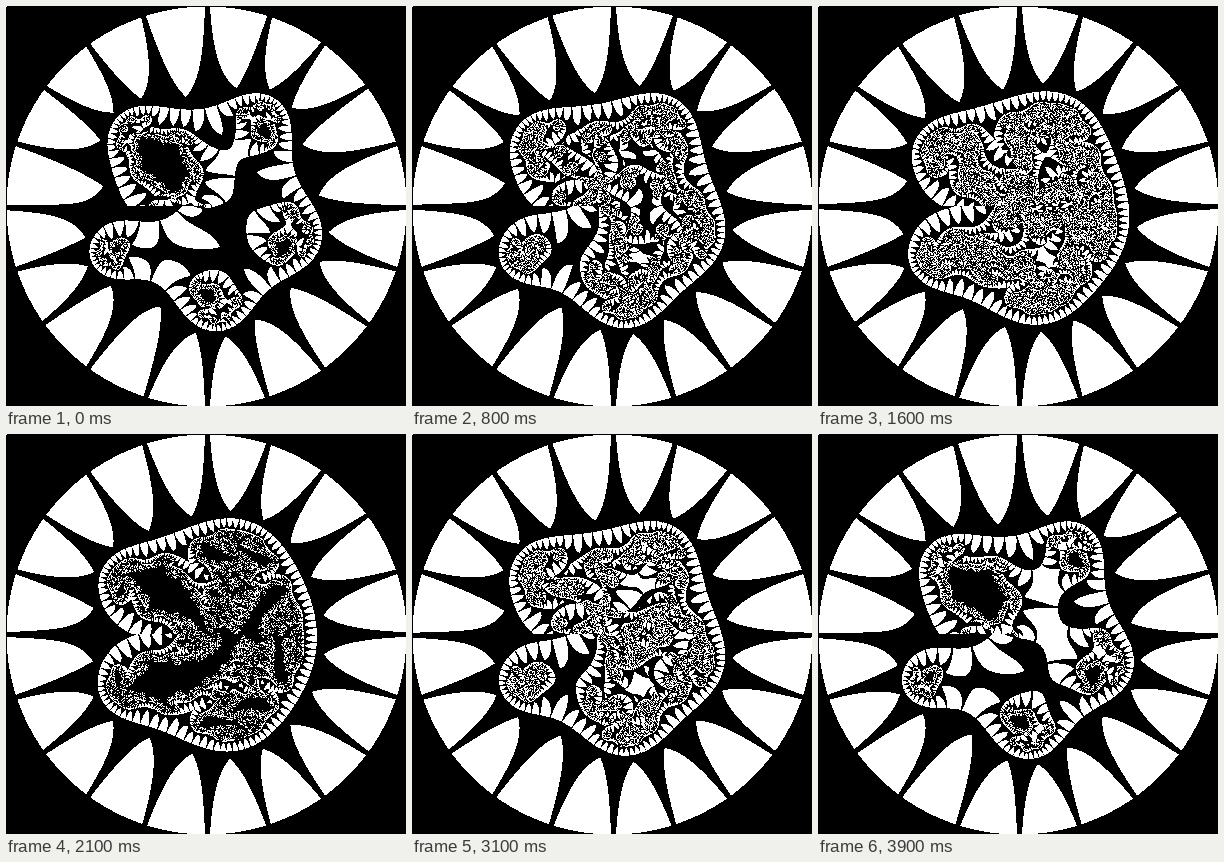
Recreate the animation shown at these times as an HTML page with a canvas. Size 400 by 400 pixels, loop 4 s.

```html
<!DOCTYPE html>
<html lang="en">
<head>
<meta charset="utf-8">
<title>Biomorph</title>
<style>
  html, body { margin: 0; width: 100%; height: 100%; overflow: hidden; background: #000; }
  canvas { display: block; width: 400px; height: 400px; }
</style>
</head>
<body>
<canvas id="stage" width="400" height="400"></canvas>
<script>
const SIZE = 400, BAIL = 2, MAX_ITER = 60;
const STEP_MS = 100, STEPS = 40, HALF = STEPS / 2;
const RE = -0.75;
const WHITE = 0xffffffff, BLACK = 0xff000000;
const ctx = document.getElementById('stage').getContext('2d');

// Biomorph test for z -> z^z + z^5 + c
function isWhite(x, y, im) {
  for (let n = 0; n < MAX_ITER; n++) {
    const rr = x * x + y * y;
    if (rr > BAIL * BAIL) break;
    const log = 0.5 * Math.log(rr || 1e-300);
    const arg = Math.atan2(y, x);
    const mag = Math.exp(x * log - y * arg);
    const ang = x * arg + y * log;
    const x2 = x * x - y * y, y2 = 2 * x * y;
    const x4 = x2 * x2 - y2 * y2, y4 = 2 * x2 * y2;
    const nx = mag * Math.cos(ang) + x4 * x - y4 * y + RE;
    const ny = mag * Math.sin(ang) + x4 * y + y4 * x + im;
    // settled on a fixed point
    if (Math.abs(nx - x) + Math.abs(ny - y) < 1e-7) return false;
    x = nx;
    y = ny;
  }
  return Math.abs(x) >= BAIL && Math.abs(y) >= BAIL;
}

function render(im) {
  const img = ctx.createImageData(SIZE, SIZE);
  const px = new Uint32Array(img.data.buffer);
  const mid = SIZE / 2, unit = mid / BAIL;
  for (let j = 0, k = 0; j < SIZE; j++) {
    for (let i = 0; i < SIZE; i++, k++) {
      px[k] = isWhite((i - mid) / unit, (j - mid) / unit, im) ? WHITE : BLACK;
    }
  }
  return img;
}

// The imaginary part of c runs from -1 to 0 and back in equal steps
const poses = Array.from({ length: HALF + 1 }, (_, n) => render(n / HALF - 1));

function draw(ms) {
  const step = Math.floor(ms / STEP_MS) % STEPS;
  ctx.putImageData(poses[HALF - Math.abs(HALF - step)], 0, 0);
}

const start = performance.now();
function tick() {
  draw(Math.max(0, performance.now() - start));
  requestAnimationFrame(tick);
}
tick();
</script>
</body>
</html>
```
